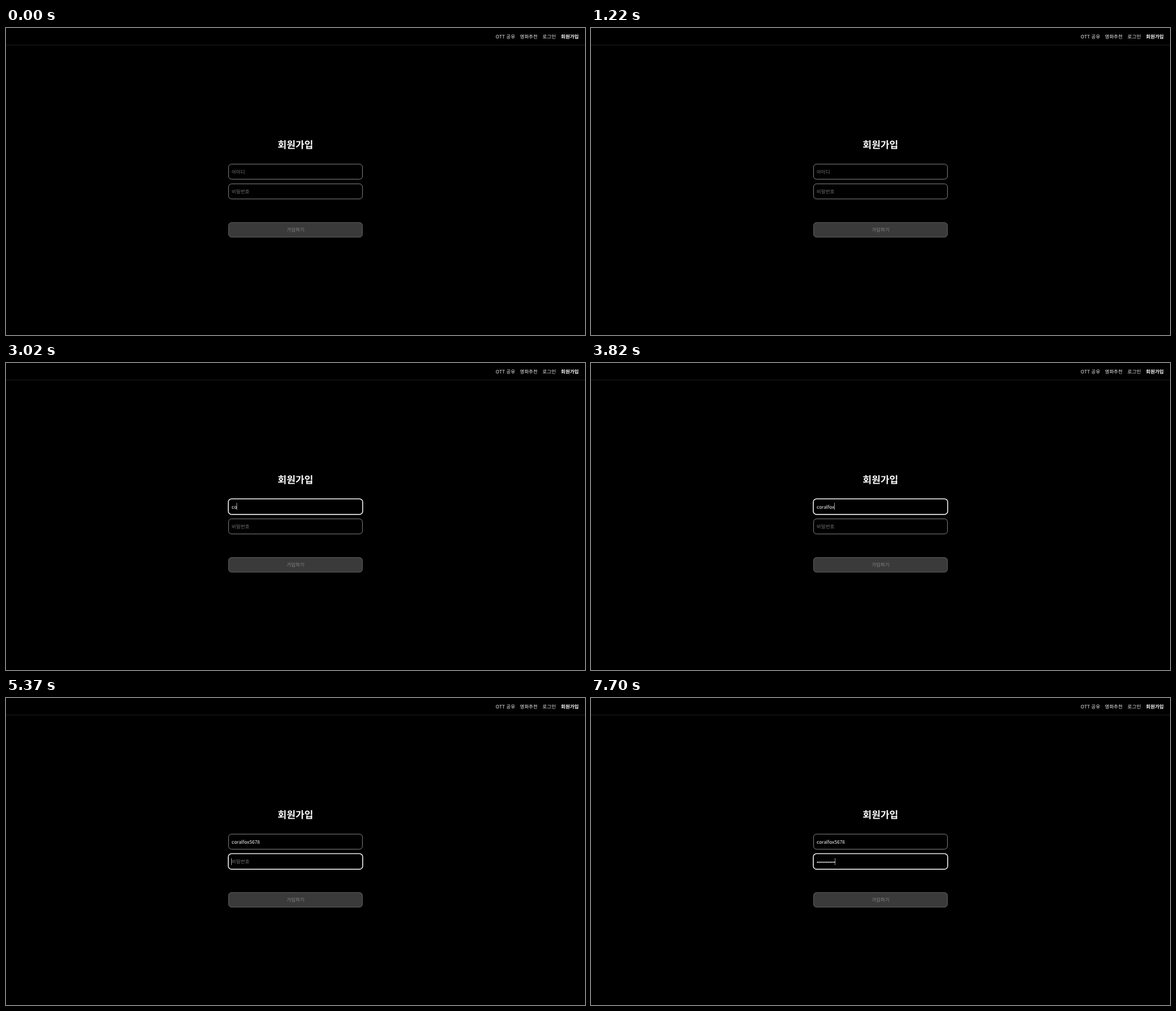
Write an HTML page that moves like this. It is 1000 by 531 pixels and loops after 8000 ms.

```html
<!DOCTYPE html>
<html lang="ko">
<head>
<meta charset="utf-8">
<title>회원가입</title>
<style>
  html, body { margin: 0; width: 100%; height: 100%; overflow: hidden; background: #000; }
  svg { display: block; width: 100%; height: 100%; }
  text {
    font: 8.33px "Noto Sans CJK KR", "Noto Sans KR", "Noto Sans CJK", "Noto Sans CJK JP", sans-serif;
    fill: #eee; white-space: pre; text-rendering: geometricPrecision;
  }
  .bold { font-weight: 700; fill: #fff; }
  .title { font-size: 16.67px; font-weight: 700; text-anchor: middle; fill: #fff; }
  .hint { fill: #757575; }
  .value { font-size: 8.1px; font-kerning: none; fill: #fff; }
  .box { fill: #000; stroke: #a2a2a2; stroke-width: .8; }
  .ring { fill: none; stroke: #f4f4f4; stroke-width: 1.3; }
  .button { fill: #3a3a3a; stroke: #747474; stroke-width: .8; }
  .label { fill: #858585; text-anchor: middle; }
</style>
</head>
<body>
<svg viewBox="0 0 1000 531" preserveAspectRatio="none">
  <rect width="1000" height="531"/>
  <rect y="29" width="1000" height="1" fill="#1d1d1f"/>
  <text x="845.8" y="18.3">OTT 공유</text>
  <text x="887.5" y="18.3">영화추천</text>
  <text x="926.6" y="18.3">로그인</text>
  <text x="958.6" y="18.3" class="bold">회원가입</text>

  <text x="500" y="208" class="title">회원가입</text>

  <rect class="box" x="384.4" y="235.4" width="231.2" height="26.1" rx="5.2"/>
  <text id="idHint" class="hint" x="389.7" y="251.8">아이디</text>
  <text id="idText" class="value" x="389.8" y="251.8"></text>

  <rect class="box" x="384.4" y="269.6" width="231.2" height="26.1" rx="5.2"/>
  <text id="pwHint" class="hint" x="389.7" y="286.3">비밀번호</text>
  <g id="dots" fill="#fff"></g>

  <rect class="button" x="384.4" y="336.4" width="231.2" height="25.4" rx="5.2"/>
  <text x="500" y="352.3" class="label">가입하기</text>

  <rect id="ring" class="ring" x="383.8" width="232.4" height="27.2" rx="5.8"/>
  <rect id="caret" width=".6" height="12" fill="#fff"/>
  <path id="pointer" d="M0 0V9.4L2.2 7.4L3.6 10.6L5.2 9.9L3.8 6.8H6.7Z" fill="#fff"/>
</svg>
<script>
  const LOOP = 8000, LEFT = 389.8, DOT = 2.67;
  const NAME = "coralfox5678";
  const ID_FOCUS = 1390, PW_FOCUS = 5370;

  // One time per typed character; equal times land together.
  const idKeys = [2890, 2990, 3080, 3180, 3680, 3750, 3820, 3820, 4670, 4735, 4800, 4970];
  const pwKeys = [5920, 6090, 6220, 6370, 6540, 6710, 6880, 7030, 7380, 7460, 7540, 7620];
  // [time, visible]
  const blinks = [[1390, 1], [1900, 0], [2460, 1], [3530, 0], [3680, 1], [4350, 0],
                  [4670, 1], [5900, 0], [5920, 1]];
  // [time, x, y]
  const path = [[700, 702, 221], [820, 634, 228.6], [910, 634, 228.6], [1070, 606, 238]];

  const el = id => document.getElementById(id);
  const [idHint, idText, pwHint, dots, ring, caret, pointer] =
    ["idHint", "idText", "pwHint", "dots", "ring", "caret", "pointer"].map(el);

  const show = (node, on) => node.setAttribute("visibility", on ? "visible" : "hidden");
  const typed = (keys, t) => keys.filter(k => k <= t).length;

  const dotList = pwKeys.map((_, i) => {
    const c = document.createElementNS("http://www.w3.org/2000/svg", "circle");
    c.setAttribute("cx", LEFT + DOT * (i + .5));
    c.setAttribute("cy", 284);
    c.setAttribute("r", 1.1);
    dots.append(c);
    return c;
  });

  function caretOn(t) {
    let on = 0;
    for (const [time, state] of blinks) if (time <= t) on = state;
    return on;
  }

  function movePointer(t) {
    const i = path.findIndex(([time]) => time > t);
    show(pointer, i > 0);
    if (i < 1) return;
    const [t0, x0, y0] = path[i - 1], [t1, x1, y1] = path[i];
    const k = (t - t0) / (t1 - t0);
    pointer.setAttribute("transform", `translate(${x0 + (x1 - x0) * k} ${y0 + (y1 - y0) * k})`);
  }

  function draw(t) {
    const n = typed(idKeys, t), m = typed(pwKeys, t), inPw = t >= PW_FOCUS;
    const name = NAME.slice(0, n);
    if (idText.textContent !== name) idText.textContent = name;
    show(idHint, !n);
    show(pwHint, !m);
    dotList.forEach((c, i) => show(c, i < m));
    show(ring, t >= ID_FOCUS);
    ring.setAttribute("y", inPw ? 269.1 : 234.8);

    const width = inPw ? m * DOT : n ? idText.getComputedTextLength() : 0;
    caret.setAttribute("x", LEFT + width - .4);
    caret.setAttribute("y", inPw ? 277 : 242);
    show(caret, caretOn(t));
    movePointer(t);
  }

  const start = performance.now();
  function tick() {
    draw((performance.now() - start) % LOOP);
    requestAnimationFrame(tick);
  }
  tick();
</script>
</body>
</html>
```
